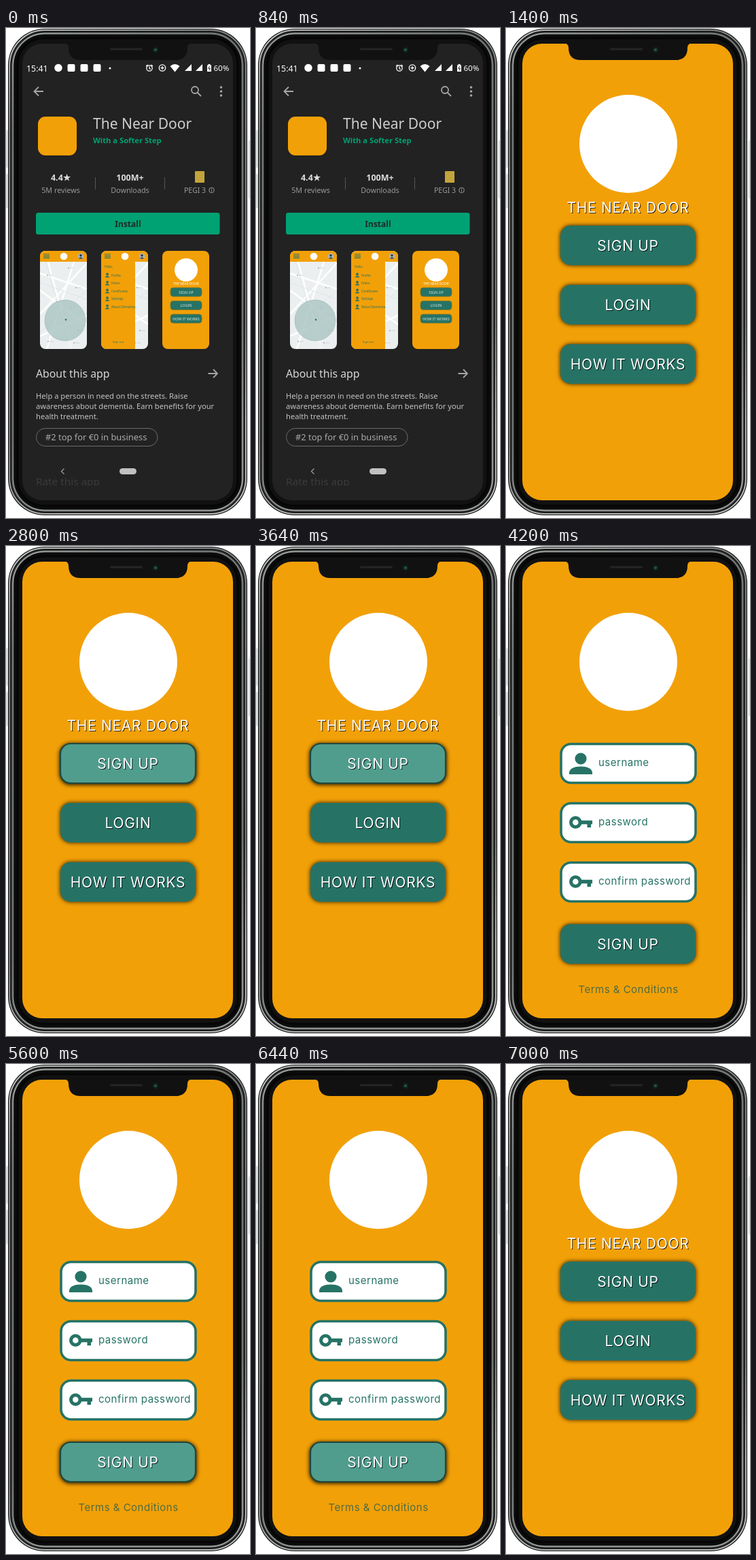
Animation, 359 px wide and 719 px high, one loop 8 s. Source, as an HTML page:

```html
<!DOCTYPE html>
<html lang="en">
<head>
<meta charset="utf-8">
<title>App sign-up walkthrough</title>
<style>
  html, body { margin: 0; height: 100%; overflow: hidden; background: #fff; }
  svg { display: block; width: 100%; height: 100%; }
  .store { font-family: "Noto Sans", sans-serif; fill: #9b9d9f; }
  .ui { font-family: Inter, sans-serif; font-size: 21px; letter-spacing: .7px; fill: #fff; }
  .ui .caption { filter: drop-shadow(1.2px 1.4px .5px #000c); }
  .ui .hint { font-size: 15px; letter-spacing: .5px; fill: #267366; }
  .button { fill: #267366; filter: drop-shadow(0 .5px 3px #000d); }
  .active .tap { fill: #509d8e; stroke: #20483d; stroke-width: 2.2; filter: drop-shadow(0 1px 3px #000); }
  .line { fill: none; stroke: #a3a5a7; stroke-width: 1.8; }
  .mid { text-anchor: middle; }
</style>
</head>
<body>
<svg id="stage" viewBox="0 0 359 719"></svg>
<script>
const stage = document.getElementById('stage');
const ORANGE = '#f2a007', TEAL = '#267366', GREEN = '#00a173';

const rect = (x, y, w, h, r, attrs) => `<rect x="${x}" y="${y}" width="${w}" height="${h}" rx="${r}" ${attrs}/>`;
const disc = (x, y, r, attrs) => `<circle cx="${x}" cy="${y}" r="${r}" ${attrs}/>`;
const path = (d, attrs) => `<path d="${d}" ${attrs}/>`;
const text = (x, y, s, attrs = '') => `<text x="${x}" y="${y}" ${attrs}>${s}</text>`;
const label = (x, y, s, size, fill, more = '') => text(x, y, s, `font-size="${size}" fill="${fill}" ${more}`);
const screen = fill => rect(24, 23, 310, 670, 29, `fill="${fill}"`);
const MID = 'class="mid"', BOLD = 'font-weight="500"';

function phone() {
  const ring = (inset, radius, attrs) =>
    rect(3 + inset, 1 + inset, 352 - 2 * inset, 714 - 2 * inset, radius, attrs);
  const sideKey = (x, y, h) => rect(x, y, 3, h, 1, 'fill="#dfe3e3"');
  return `<linearGradient id="steel" x2="0.25" y2="1">
      <stop stop-color="#d4d6d6"/><stop offset=".2" stop-color="#8c8f8f"/>
      <stop offset=".8" stop-color="#858888"/><stop offset="1" stop-color="#c4c6c6"/>
    </linearGradient>` +
    sideKey(0, 150, 55) + sideKey(0, 214, 50) + sideKey(356, 165, 85) +
    ring(0, 54, 'fill="#1c1d1d"') +
    ring(2.2, 52, 'fill="none" stroke="url(#steel)" stroke-width="1.8"') +
    ring(7, 47, 'fill="#0b0b0b" stroke="#5c5e5e" stroke-width="3"') +
    ring(7, 47, 'fill="none" stroke="url(#steel)" stroke-width="1"') +
    ring(14, 38, 'fill="#111" stroke="#060606" stroke-width="3"');
}

const notch = () =>
  path('M86 22.5Q92 23 92 29Q92 47 110 47H249Q267 47 267 29Q267 23 273 22.5Z', 'fill="#111"') +
  rect(153, 29.5, 48, 3, 1.5, 'fill="#242525"') +
  disc(220, 32, 4.5, 'fill="#10201c"') + disc(220, 32, 2, 'fill="#23594a"');

function statusBar() {
  const white = 'fill="#fff"';
  const stroke = 'fill="none" stroke="#fff" stroke-width="1.3"';
  const signal = x => path(`M${x - 5} 63L${x + 5} 53V63Z`, white);
  return label(30, 63.5, '15:41', 12.4, '#fff', BOLD) +
    disc(77, 58.5, 5.7, white) + [96, 115, 134].map(x => rect(x - 5.5, 53, 11, 11, 2, white)).join('') +
    disc(153, 59, 1.5, white) +
    disc(211, 59, 4.2, stroke) + path('M211 56.5V59.5L213 60.5M206 56L208.5 54M216 56L213.5 54', stroke) +
    disc(230, 58.5, 4.7, stroke) + path('M227.5 58.5h5M230 56v5', stroke) +
    path('M241.5 56Q248.5 50 255.5 56L248.5 64.5Z', white) + signal(268) + signal(284) +
    path('M296 54.5h1.5V53h3v1.5h1.5V64h-6Z', white) + path('M299.5 56l-1.7 3.3h2.6l-1.5 3', 'fill="none" stroke="#222"') +
    label(305.5, 63, '60%', 11.5, '#fff');
}

function thumbHeader(x) {
  return rect(x, 327, 69, 16, 0, `fill="${ORANGE}"`) +
    path(`M${x + 5} 332h9m-9 2.7h9m-9 2.7h9`, `fill="none" stroke="${TEAL}" stroke-width="1.2"`) +
    disc(x + 35, 335, 5.3, 'fill="#fff"') +
    disc(x + 60, 335, 4.4, 'fill="#a9b5ba"') + disc(x + 60, 333.7, 1.7, 'fill="#333"') +
    path(`M${x + 57} 338.5q3-4 6 0Z`, 'fill="#333"');
}

function thumbMap(x) {
  const pin = (dx, y) => disc(x + dx, y, 1, 'fill="#9cafb5"') + rect(x + dx + 2, y - .4, 6, .8, 0, 'fill="#c2ced2"');
  return rect(x, 327, 69, 144, 0, 'fill="#eceff0"') +
    path(`M${x} 360l69 23M${x} 420l69-75M${x + 12} 343l34 128M${x} 385l69 50M${x + 50} 343l-40 128M${x} 452l69-30`,
      'fill="none" stroke="#fff" stroke-width="2.5"') +
    path(`M${x + 8} 343l38 128M${x} 374l69 24M${x} 446l69-61`, 'fill="none" stroke="#dbe2e4" stroke-width=".8"') +
    [[11, 363], [42, 352], [53, 381], [24, 402], [45, 410], [57, 444], [12, 460], [50, 462]].map(p => pin(...p)).join('');
}

function thumbnails() {
  const clip = x => `<clipPath id="thumb${x}">${rect(x, 327, 69, 144, 8, '')}</clipPath>`;
  const card = (x, body) => clip(x) + `<g clip-path="url(#thumb${x})">${body}</g>`;
  const items = ['Profile', 'Inbox', 'Certificates', 'Settings', 'About Dementia'];
  const menu = items.map((s, i) => {
    const y = 363 + i * 11.6;
    return disc(149, y - 1.8, 1.9, `fill="${TEAL}"`) + path(`M145.5 ${y + 3}q3.5-5 7 0Z`, `fill="${TEAL}"`) +
      label(155, y + 1.5, s, 4.6, TEAL);
  }).join('');
  const buttons = ['SIGN UP', 'LOGIN', 'HOW IT WORKS'].map((s, i) =>
    rect(242, 381 + i * 19.5, 46, 13, 4, `fill="${TEAL}" stroke="#7c7429" stroke-width=".8"`) +
    label(265, 389.5 + i * 19.5, s, 5.4, '#dfeae6', MID)).join('');
  return card(50, thumbMap(50) + disc(87, 429, 30, 'fill="#a9c5c2" fill-opacity=".8" stroke="#9fbab8" stroke-width=".7"') +
      disc(88, 428, 1.3, `fill="${TEAL}"`) + thumbHeader(50)) +
    card(140, thumbMap(140) + rect(140, 342, 50, 129, 0, `fill="${ORANGE}"`) + label(145, 352, 'Hello,', 4.6, TEAL) +
      menu + label(157, 462, 'Sign out', 4.2, TEAL) + thumbHeader(140)) +
    card(230, rect(230, 327, 69, 144, 0, `fill="${ORANGE}"`) + disc(265, 355, 17, 'fill="#fff"') +
      label(265, 377, 'THE NEAR DOOR', 4.8, '#fff', MID) + buttons);
}

function store() {
  const stat = (x, top, bottom) =>
    label(x, 224, top, 12.5, '#dcdddd', MID + ' font-weight="600"') + label(x, 241.5, bottom, 10.8, '#97999b', MID);
  const about = ['Help a person in need on the streets. Raise',
    'awareness about dementia. Earn benefits for your', 'health treatment.'];
  return `<g class="store">` + screen('#222') + statusBar() +
    path('M55 93H42M48 86.5L41.5 93L48 99.5', 'class="line"') +
    disc(278, 91, 5, 'class="line"') + path('M281.5 94.5L287 100', 'class="line"') +
    [87, 93, 99].map(y => disc(316.5, y, 1.8, 'fill="#a3a5a7"')).join('') +
    rect(47, 130, 57, 57, 11, `fill="${ORANGE}"`) +
    label(128, 148, 'The Near Door', 21, '#cdcecf', BOLD) +
    label(128, 168.5, 'With a Softer Step', 11.2, GREEN, 'font-weight="600"') +
    stat(80.5, '4.4★', '5M reviews') + stat(182.5, '100M+', 'Downloads') +
    path('M131.5 219V237M233.5 219V237', 'stroke="#555" stroke-width="1"') +
    rect(278, 210, 14, 17, 1, 'fill="#c3a43c"') + label(262, 241.5, 'PEGI 3', 10.5, '#97999b') +
    disc(302.5, 238, 3.8, 'fill="none" stroke="#97999b"') + path('M302.5 237.3v2.7m0-4.6v1', 'stroke="#97999b"') +
    rect(44, 271, 270.5, 32, 3.5, `fill="${GREEN}"`) +
    label(179.5, 291.8, 'Install', 12, '#1d2b27', MID + ' font-weight="600"') +
    thumbnails() +
    label(44, 512.5, 'About this app', 15.8, '#d5d6d7', BOLD) +
    path('M297.5 507H310.5M305 501L311 507L305 513', 'class="line"') +
    about.map((s, i) => label(44, 543.5 + i * 15.2, s, 11.15, '#c3c4c5')).join('') +
    rect(44.5, 587.5, 178.5, 26, 13, 'fill="none" stroke="#6a6c6e"') +
    label(58, 605, '#2 top for €0 in business', 12.9, '#a9abad') +
    `<clipPath id="fold">${rect(40, 650, 200, 21.5, 0, '')}</clipPath>` +
    label(44, 671, 'Rate this app', 15.3, '#3a3b3c', 'clip-path="url(#fold)"') +
    path('M85.5 646.5L81.5 650.5L85.5 654.5', 'fill="none" stroke="#999" stroke-width="1.3"') +
    rect(167, 646, 25, 9, 4.5, 'fill="#bfc0c1"') + `</g>`;
}

const emblem = disc(180, 170, 72, 'fill="#fff"');
const caption = (y, s) => text(179.5, y, s, 'class="mid caption"');
const button = (y, s, tap = '') => rect(80, y, 199, 58, 15, `class="button ${tap}"`) + caption(y + 37, s);

const menu = () => `<g class="ui">` + screen(ORANGE) + emblem + caption(271, 'THE NEAR DOOR') +
  button(290, 'SIGN UP', 'tap') + button(377, 'LOGIN') + button(464, 'HOW IT WORKS') + `</g>`;

function form() {
  const person = disc(110, 312, 8.6, `fill="${TEAL}"`) +
    path('M93 335V332Q95 323.5 110 323.5Q125 323.5 127 332V335Z', `fill="${TEAL}"`);
  const key = y => disc(102.3, y, 6.8, `fill="none" stroke="${TEAL}" stroke-width="5"`) +
    path(`M109 ${y - 2.7}H127V${y + 2.7}H125V${y + 7.5}H119.5V${y + 2.7}H109Z`, `fill="${TEAL}"`);
  const field = (y, s, icon) => rect(81, y + .5, 198, 57, 14.5, `fill="#fff" stroke="${TEAL}" stroke-width="3.6"`) +
    icon + text(136, y + 33, s, 'class="hint"');
  return `<g class="ui">` + screen(ORANGE) + emblem +
    field(290, 'username', person) + field(377, 'password', key(405.5)) +
    field(464, 'confirm password', key(492.5)) + button(555, 'SIGN UP', 'tap') +
    text(180, 656, 'Terms &amp; Conditions', 'class="mid hint" style="fill:#4c6d43"') + `</g>`;
}

const scenes = { store, menu, form };
stage.innerHTML = phone() + Object.keys(scenes).map(k => `<g id="${k}">${scenes[k]()}</g>`).join('') + notch();

// [scene, button pressed], one step every STEP ms
const steps = [['store'], ['menu'], ['menu', true], ['form'], ['form', true], ['menu']];
const STEP = 1400, LOOP = 8000;

function draw(now) {
  const [current, pressed = false] = steps[Math.floor(now % LOOP / STEP)];
  for (const name in scenes) {
    const group = document.getElementById(name);
    group.style.display = name === current ? '' : 'none';
    group.classList.toggle('active', pressed);
  }
  requestAnimationFrame(() => draw(performance.now() - start));
}
const start = performance.now();
draw(0);
</script>
</body>
</html>
```
